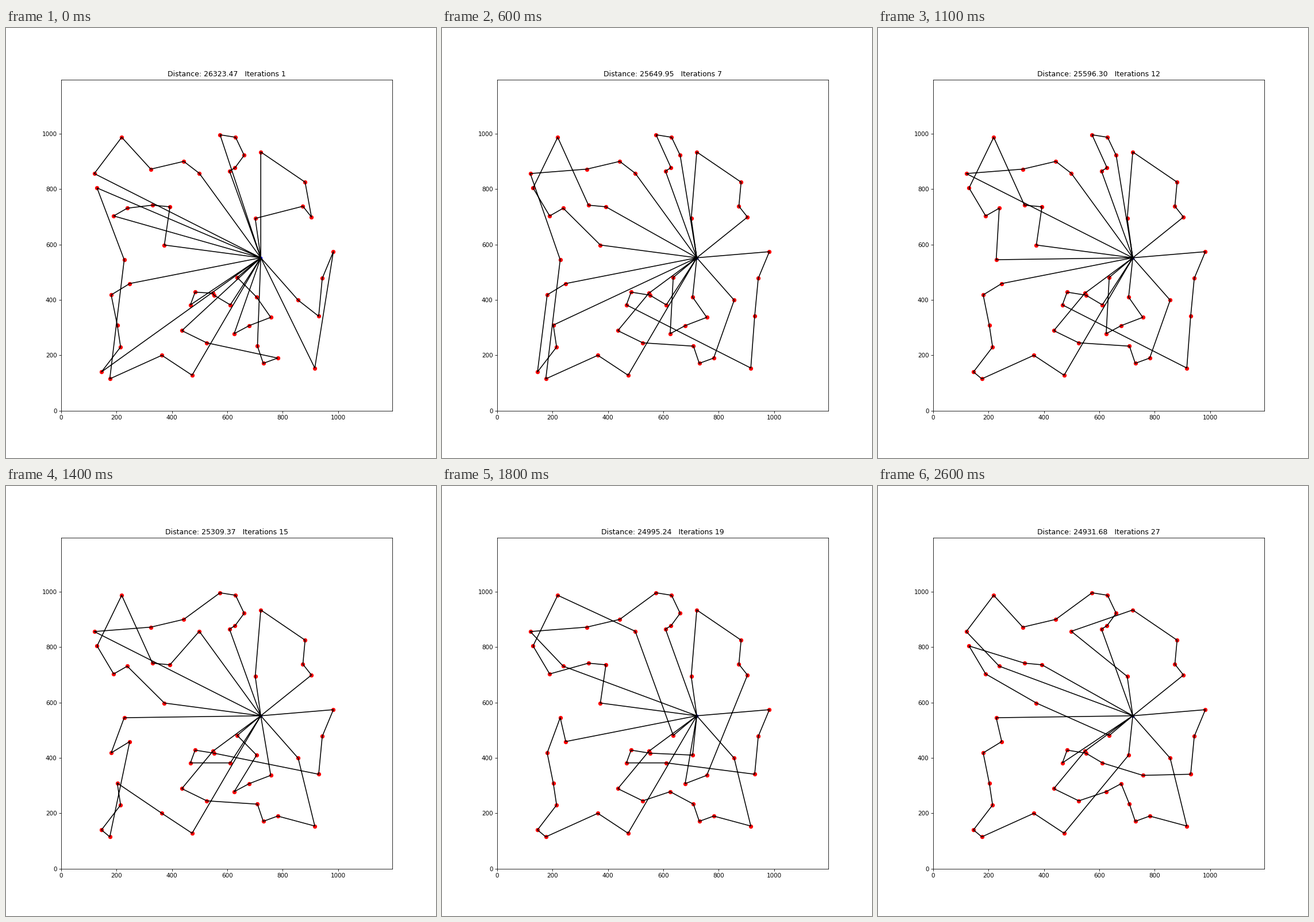
A matplotlib script that plays this animation: 748 px wide and 748 px high, repeating every 6700 ms.

```python
import numpy as np
import matplotlib.pyplot as plt
from matplotlib.animation import FuncAnimation

STEP_MS = 100
LOOP_MS = 6700

# Stop 0 is the depot
STOPS = np.array([
    (721, 552), (219, 987), (120, 856), (130, 804), (324, 872), (443, 900),
    (499, 857), (574, 996), (630, 987), (661, 922), (628, 877), (608, 865),
    (721, 934), (881, 825), (873, 738), (904, 699), (701, 694), (190, 703),
    (239, 731), (330, 742), (393, 736), (373, 598), (228, 545), (248, 459),
    (181, 418), (203, 309), (215, 230), (146, 140), (176, 115), (364, 200),
    (473, 128), (436, 289), (526, 245), (467, 382), (484, 428), (548, 424),
    (552, 417), (611, 382), (636, 481), (706, 410), (757, 337), (679, 307),
    (625, 278), (709, 233), (730, 171), (782, 190), (856, 399), (916, 154),
    (930, 341), (943, 478), (983, 574),
])


def run(a, b):
    """Consecutive stops from a to b, in either direction."""
    step = 1 if b >= a else -1
    return list(range(a, b + step, step))


# Stretches that stay together in many routes
NORTH = run(11, 7) + [5, 4]
RIGHT = run(12, 15)
EAST = run(50, 48)
SOUTH = [46, 47] + run(45, 43)
TAIL = [32, 31, 35]
WEST = run(24, 30)

START = [
    [2, 1, 4, 5, 6], [3, 22, 28, 29, 30], run(17, 21), run(23, 27),
    run(7, 11), [12, 13, 15, 14, 16], [46, 48, 49, 50, 47],
    [43, 44, 45, 32, 31], run(38, 42), run(33, 37),
]

# (iteration, cost, routes that are new by then)
STAGES = [
    (1, 26323.47, START),
    (7, 25649.95, [
        [11, 10, 7, 8, 9], [16] + RIGHT, [38] + run(42, 39),
        [23, 24] + run(27, 25), [6, 5, 4, 2, 22, 28, 29, 30],
        [20, 19, 1, 3, 17, 18, 21], EAST + [47, 33, 34, 36, 37],
        run(46, 43) + TAIL]),
    (12, 25596.30, [
        run(23, 30), [6, 5, 4, 2], [21, 20, 19, 1, 3, 17, 18, 22]]),
    (15, 25309.37, [
        [2] + NORTH[::-1], [6, 20, 19, 1, 3, 17, 18, 21],
        [22, 24, 23] + run(28, 25) + [29, 30], EAST + [36, 34, 33, 37],
        SOUTH + TAIL, [38, 39] + run(42, 40)]),
    (19, 24995.24, [
        [23, 22] + WEST, NORTH + [2, 18], [38, 6, 1, 3, 17, 19, 20, 21],
        SOUTH + [42] + TAIL, [16] + RIGHT + [40, 41],
        EAST + [37, 33, 34, 36, 39]]),
    (23, 25039.03, [
        NORTH + [1, 2, 18], [16, 6] + RIGHT, SOUTH + [41, 42] + TAIL,
        EAST + [40, 33, 37, 36, 38], [17, 3, 19, 20, 21, 34],
        [22, 23] + WEST + [39]]),
    (27, 24931.68, [
        EAST + [40, 37, 36, 34, 33], [20, 19, 3, 17, 21, 38]]),
]
LAST = STAGES[-1][0]


def adopt(routes, new):
    """Add the new routes and take their stops out of the others."""
    taken = {s for r in new for s in r}
    kept = [[s for s in r if s not in taken] for r in routes]
    return [r for r in kept if r] + new


def solve():
    """Depot-to-depot path and cost for every iteration."""
    routes, steps = START, [START]
    for (a, _, _), (b, _, new) in zip(STAGES, STAGES[1:]):
        for it in range(a + 1, b + 1):
            count = len(new) * (it - a) // (b - a)
            steps.append(adopt(routes, new[:count]))
        routes = steps[-1]
    paths = [STOPS[[0] + [s for r in step for s in r + [0]]]
             for step in steps]
    its, costs, _ = zip(*STAGES)
    return paths, np.interp(np.arange(1, LAST + 1), its, costs)


PATHS, COSTS = solve()

fig, ax = plt.subplots(figsize=(10, 10), dpi=74.8)
fig.subplots_adjust(left=0.126)
limit = 1.2 * STOPS.max()
ax.set(aspect="equal", xlim=(0, limit), ylim=(0, limit))
ax.scatter(*STOPS[1:].T, c="red")
ax.scatter(*STOPS[0], c="blue", s=20)
line, = ax.plot([], [], color="black", lw=1.5)
title = ax.set_title("")


def draw(frame):
    i = min(frame, LAST - 1)
    line.set_data(*PATHS[i].T)
    title.set_text(f"Distance: {COSTS[i]:.2f}   Iterations {i + 1}")
    return line, title


anim = FuncAnimation(fig, draw, frames=LOOP_MS // STEP_MS, interval=STEP_MS,
                     repeat=True, repeat_delay=0, blit=False)
plt.show()
```
